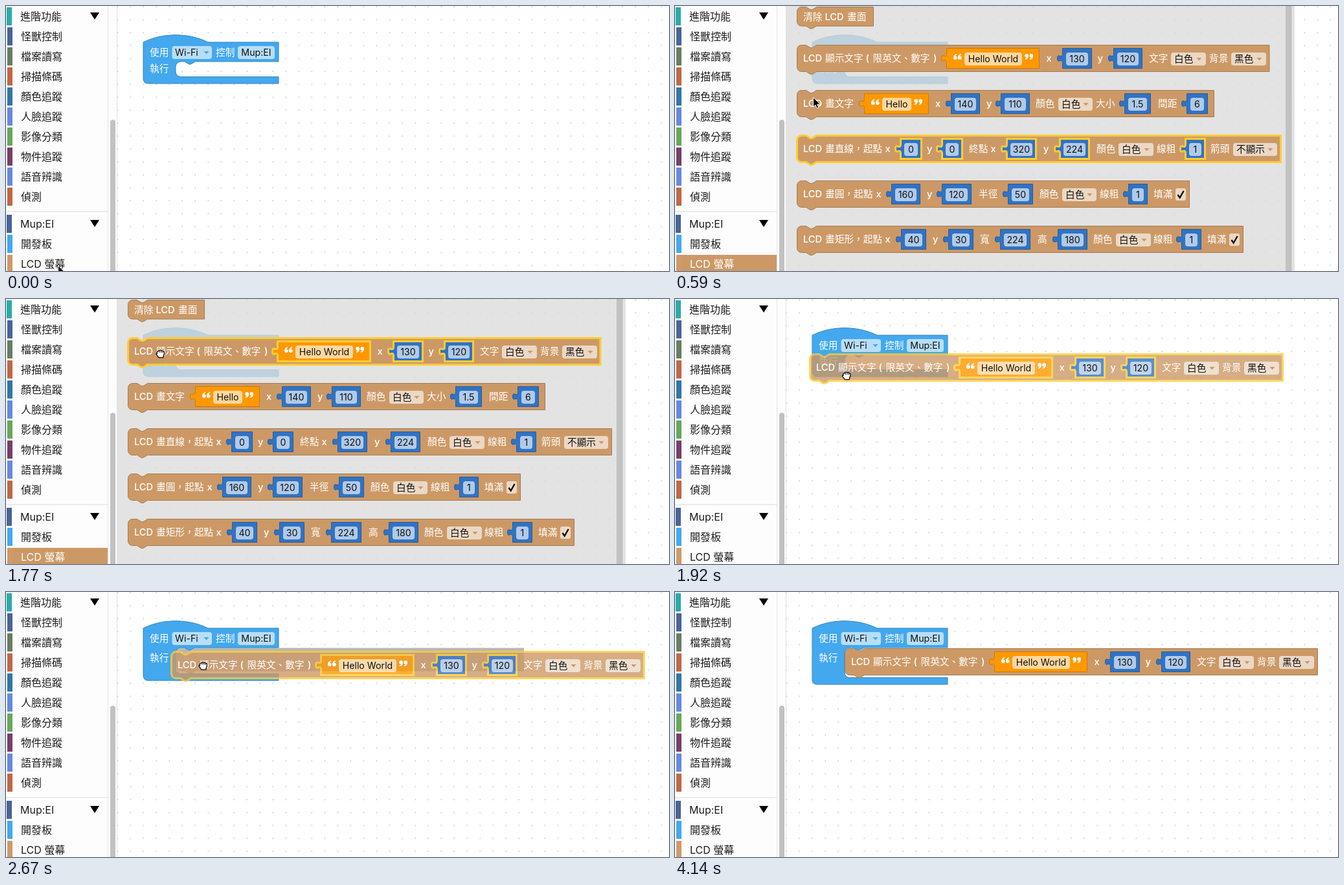
These frames come from a looping animation (1024 px wide and 410 px high, 4.59 s). An HTML page:

```html
<!DOCTYPE html>
<html lang="zh-Hant">
<head>
<meta charset="utf-8">
<title>Block editor</title>
<style>
  html, body { margin: 0; width: 100%; height: 100%; overflow: hidden; background: #fff; }
  svg { display: block; width: 100vw; height: 100vh; }
  text { font: 14.67px Inter, "Noto Sans CJK TC", sans-serif; white-space: pre; }
  .label { fill: #fff; font-weight: 500; }
  .val { font-size: 14.2px; fill: #111; }
  .menu { font-size: 16px; fill: #1c1c1c; }
  .tan { fill: #cc9966; stroke: #a37a52; }
  .blue { fill: #3073c4; stroke: #265c9d; }
  .orange { fill: #ff9800; stroke: #cc7a00; }
  .root { fill: #43a8ee; stroke: #3586be; }
  .field { fill: #fff; fill-opacity: .62; }
  .sel .shape { stroke: #fc3; stroke-width: 3; }
  .drag .shapes { opacity: .8; }
</style>
</head>
<body>
<svg id="stage" viewBox="0 0 1024 410"></svg>
<script>
const NAME = 'Mup:EI';
const NOTCH = 'l5.5 3.5q2.5 1.5 5 0l5.5-3.5';
const NOTCH_BACK = 'l-5.5 3.5q-2.5 1.5-5 0l-5.5-3.5';

const text = (cls, x, y, s, extra = '') => `<text class="${cls}" x="${x}" y="${y}" ${extra}>${s}</text>`;
const rect = (x, y, w, h, fill, extra = '') =>
  `<rect x="${x}" y="${y}" width="${w}" height="${h}" fill="${fill}" ${extra}/>`;
const path = (cls, d) => `<path class="${cls}" d="${d}"/>`;
const field = (x, c, w) => `<rect class="field" x="${x}" y="${c - 9}" width="${w}" height="20" rx="4"/>`;
const caret = (x, y, fill) => `<path d="M${x - 4} ${y}h8l-4 4.5z" fill="${fill}"/>`;

// Statement block outline with notches
const outline = (x, y, w, h) =>
  `M${x} ${y + 7}a7 7 0 0 1 7-7H${x + 14}${NOTCH}H${x + w}V${y + h}H${x + 30}${NOTCH_BACK}H${x + 7}a7 7 0 0 1-7-7z`;

// Value block outline with a puzzle tab on its left
const plug = (x, c, w) =>
  `M${x} ${c - 15.5}h${w}v31h${-w}v-8c0-10-8 2.5-8-7.5s8 2.5 8-7.5z`;

function quote(x, y, flip) {
  const one = 'M2.8 9a2.8 2.8 0 0 1-2.8-3C0 2.5 2 .5 5 0l.4 1.2C3.6 1.9 3 2.8 3 3.4a2.8 2.8 0 0 1-.2 5.6z';
  const turn = flip ? 'rotate(180 6.5 4.5)' : '';
  return `<g fill="#fff" transform="translate(${x} ${y}) ${turn}"><path d="${one}"/><path d="${one}" transform="translate(7)"/></g>`;
}

const draw = {
  t: (c, x, s) => ['', text('label', x, c + 5.4, s)],
  n: (c, x, w, s) => [
    path('shape blue', plug(x - 5.5, c, w + 11)),
    field(x, c, w) + text('val', x + w / 2, c + 6.2, s, 'text-anchor="middle"')],
  s: (c, x, w, s) => [
    path('shape orange', plug(x - 27.5, c, w + 54)),
    field(x, c, w) + text('val', x + w / 2, c + 6.2, s, 'text-anchor="middle"') +
    quote(x - 17, c - 7) + quote(x + w + 4, c - 7, true)],
  d: (c, x, w, s) => ['',
    field(x, c, w) + text('val', x + 5, c + 6, s, 'style="font-size:14.67px"') + caret(x + w - 10.5, c - 1, '#cc9966')],
  c: (c, x) => ['',
    `<rect class="field" x="${x}" y="${c - 9}" width="16" height="19" rx="3"/>` +
    `<path d="M${x + 3.5} ${c + 1}l3.2 4.6 6-10.6" fill="none" stroke="#000" stroke-width="2.2"/>`]
};

function block(id, c, right, parts, h = 41) {
  const drawn = parts.map(([kind, ...a]) => draw[kind](c, ...a));
  const body = path('shape tan', outline(188.5, c - h / 2, right - 188.5, h));
  return `<g id="${id}"><g class="shapes">${body}${drawn.map(d => d[0]).join('')}</g>${drawn.map(d => d[1]).join('')}</g>`;
}

const LCD = ['t', 198, 'LCD'];
const showText = [LCD, ['t', 232, '顯示文字'], ['t', 294.5, '('], ['t', 305.5, '限英文、數字'], ['t', 399, ')'],
  ['s', 447, 89, 'Hello World'], ['t', 573.5, 'x'], ['n', 604, 34, '130'], ['t', 652.5, 'y'], ['n', 683, 33, '120'],
  ['t', 732, '文字'], ['d', 766, 54, '白色'], ['t', 825, '背景'], ['d', 859, 54, '黑色']];

const flyout = () =>
  rect(171, 0, 786, 410, '#ddd', 'opacity=".8"') + rect(943, 0, 9.5, 410, '#c2c2c2') +
  block('clear', 16.3, 306.5, [['t', 198, '清除'], ['t', 231.5, 'LCD'], ['t', 266, '畫面']], 29.5) +
  block('show', 81, 918, showText) +
  block('write', 151, 832.5, [LCD, ['t', 232, '畫文字'], ['s', 320, 45, 'Hello'], ['t', 402, 'x'], ['n', 432, 33, '140'],
    ['t', 481, 'y'], ['n', 509, 33, '110'], ['t', 557, '顏色'], ['d', 592, 53, '白色'], ['t', 650, '大小'],
    ['n', 700, 29, '1.5'], ['t', 746, '間距'], ['n', 796, 21, '6']]) +
  block('line', 221, 935.5, [LCD, ['t', 232, '畫直線，起點'], ['t', 324.5, 'x'], ['n', 354, 21, '0'], ['t', 389, 'y'],
    ['n', 418, 20, '0'], ['t', 454, '終點'], ['t', 487.5, 'x'], ['n', 518, 34, '320'], ['t', 569, 'y'], ['n', 600, 34, '224'],
    ['t', 651, '顏色'], ['d', 685, 54, '白色'], ['t', 744, '線粗'], ['n', 794, 19, '1'], ['t', 827, '箭頭'], ['d', 862, 68, '不顯示']]) +
  block('circle', 291, 794.5, [LCD, ['t', 232, '畫圓，起點'], ['t', 310.5, 'x'], ['n', 340, 33, '160'], ['t', 389, 'y'],
    ['n', 418, 34, '120'], ['t', 469, '半徑'], ['n', 520, 27, '50'], ['t', 563, '顏色'], ['d', 598, 53, '白色'],
    ['t', 656, '線粗'], ['n', 706, 18, '1'], ['t', 739, '填滿'], ['c', 773]]) +
  block('box', 361, 877.5, [LCD, ['t', 232, '畫矩形，起點'], ['t', 324.5, 'x'], ['n', 355, 27, '40'], ['t', 398, 'y'],
    ['n', 428, 27, '30'], ['t', 471, '寬'], ['n', 508, 35, '224'], ['t', 560, '高'], ['n', 597, 34, '180'],
    ['t', 646, '顏色'], ['d', 681, 54, '白色'], ['t', 739, '線粗'], ['n', 788, 19, '1'], ['t', 822, '填滿'], ['c', 856]]);

const rootPath = inner =>
  `M212 56c30-15 70-15 100 0H421V86H292${NOTCH_BACK}H270a8 8 0 0 0-8 8V${inner - 8}a8 8 0 0 0 8 8H421v10.5H219a7 7 0 0 1-7-7z`;

const rootBlock = () =>
  '<path id="root" class="root"/>' + text('label', 222, 77, '使用') + field(256.5, 71, 61.5) +
  text('val', 261, 77, 'Wi-Fi') + caret(309.5, 70, '#43a8ee') + text('label', 324, 77, '控制') +
  field(358, 71, 57) + text('val', 386.5, 77, NAME, 'text-anchor="middle"') +
  '<text id="run" class="label" x="222">執行</text>' +
  `<path id="marker" d="${outline(262.5, 86.5, 537.5, 36)}" opacity=".28"/>`;

const menuItems = [['進階功能', '#2aabab'], ['怪獸控制', '#4a6498'], ['檔案讀寫', '#687d62'], ['掃描條碼', '#c06845'],
  ['顏色追蹤', '#2f77a8'], ['人臉追蹤', '#6689e0'], ['影像分類', '#66a85a'], ['物件追蹤', '#773f6b'],
  ['語音辨識', '#6689e0'], ['偵測', '#c06845'], [NAME, '#4a6498'], ['開發板', '#43a9f0'], ['LCD 螢幕', '#d09a68']];

function sidebar() {
  let out = rect(0, 0, 171, 410, '#fdfdfd') + rect(157, 0, 1, 410, '#e4e4e4') + rect(171, 0, 1, 410, '#e2e2e2') +
    rect(161, 176, 8, 260, '#c1c1c1', 'rx="4"') + rect(0, 317.5, 157, 1, '#dcdcdc') +
    rect(10, 385, 147, 25, '#cc9966', 'id="active"');
  menuItems.forEach(([s, color], i) => {
    const y = 16 + 31 * i + (i > 9 ? 11 : 0), head = i % 10 === 0;
    out += rect(head ? 1 : 2, y - 14, 8, 28, color) + text('menu', head ? 22 : 23, y + 6, s, i === 12 ? 'id="last"' : '');
    if (head) out += `<path d="M130 ${y - 6}h14l-7 11z"/>`;
  });
  return out;
}

const cursors =
  '<path id="arrow" d="M.5.5V15l3.4-3 2.3 5.2 2.6-1.1-2.3-5H11.5z" stroke="#fff" stroke-width="1"/>' +
  '<g id="hand" fill="#fff" stroke="#000" stroke-width="1.2" stroke-linejoin="round">' +
  '<path d="M-5-.5q-1-3.2 1.2-3.2 .4-1.9 2.3-1.4 1.2-1.3 2.6-.1 1.8-.6 2.4.9 2.3-.2 2.4 2 .2 3-1.2 5l-.5 3h-7l-1.2-2.2q-2.6-2.6-2.6-3.2 .1-1.4 1.6-.8z"/>' +
  '<path d="M-1.5-4.5v2.2M1.1-4.5v2.2M3.5-3.6v1.8" fill="none"/></g>';

const stage = document.getElementById('stage');
stage.innerHTML =
  '<defs><pattern id="grid" x="162" y="-9" width="20" height="20" patternUnits="userSpaceOnUse">' +
  rect(9.5, 9.5, 1.6, 1.6, '#c4c4c4') + '</pattern></defs>' +
  rect(0, 0, 1024, 410, '#fff') + rect(172, 0, 852, 410, 'url(#grid)') +
  rootBlock() + `<g id="flyout">${flyout()}</g>` + block('piece', 81, 918.5, showText) + sidebar() + cursors;

const $ = id => document.getElementById(id);
const show = (id, on) => $(id).style.display = on ? '' : 'none';
const place = (id, x, y) => $(id).setAttribute('transform', `translate(${x} ${y})`);

const LOOP = 4590;
// time, cursor, cursor x, cursor y, block dx, block dy
const steps = [
  [0, 'arrow', 80, 401], [440, 'arrow', 210, 300], [590, 'arrow', 213, 141], [740, 'arrow', 215, 83],
  [1040, 'arrow', 220, 86], [1330, 'arrow', 224, 99], [1480, 'arrow', 228, 89], [1630, 'arrow', 236, 79],
  [1770, 'hand', 238.5, 85],
  [1920, 'hand', 265, 119, 20, 25], [2070, 'hand', 272, 127, 31, 41], [2220, 'hand', 285, 128, 37, 49],
  [2370, 'hand', 299, 118, 56, 42], [2520, 'hand', 304, 115, 67, 33], [2670, 'hand', 304.5, 114.5, 67, 32],
  [2970, 'hand', 270, 75, 74, 27], [3110, 'hand', 305, 114, 74, 27],
  [3260, 'arrow', 458, 200, 74, 27], [3410, 'arrow', 682, 259, 74, 27], [3550, 'arrow', 684, 259, 74, 27],
  [3850, 'arrow', 709, 266, 74, 27], [4000, 'arrow', 989, 382, 74, 27], [4140, '', 0, 0, 74, 27]
];

let start;
function frame(now) {
  start ??= now;
  const t = (now - start) % LOOP;
  const [, cursor, x, y, dx, dy] = steps.findLast(s => s[0] <= t);
  const open = t >= 140 && t < 1920;
  const preview = t >= 2370 && t < 2970;
  const inner = t < 2370 ? 109.5 : preview ? 126.5 : 132.5;

  for (const id of ['arrow', 'hand']) show(id, id === cursor);
  if (cursor) place(cursor, x, y);

  show('flyout', open);
  show('active', open);
  $('last').style.fill = open ? '#fff' : '';
  $('line').classList.toggle('sel', t >= 590 && t < 740);
  $('show').classList.toggle('sel', t >= 740);

  $('root').setAttribute('d', rootPath(inner));
  $('run').setAttribute('y', t < 2370 ? 102 : 107.3);
  show('marker', preview);

  show('piece', t >= 1920);
  if (t >= 1920) place('piece', dx, dy);
  $('piece').classList.toggle('sel', t < 3850);
  $('piece').classList.toggle('drag', t < 2970);
  requestAnimationFrame(frame);
}
requestAnimationFrame(frame);
</script>
</body>
</html>
```
